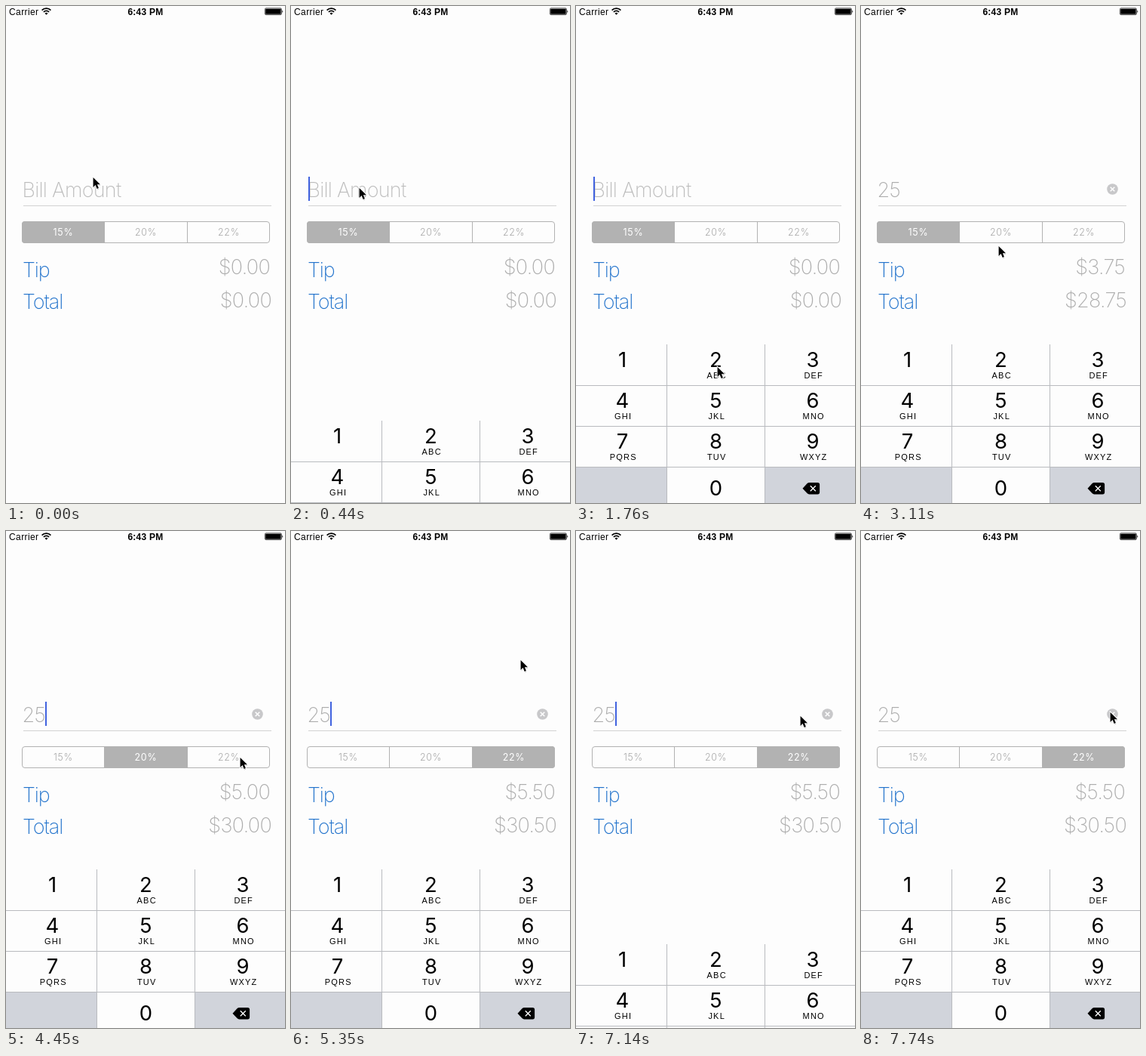
An HTML page for the animation above (8 s loop, 370 by 658 pixels).

```html
<!DOCTYPE html>
<html lang="en">
<head>
<meta charset="utf-8">
<title>Tip calculator</title>
<style>
  html, body { margin: 0; width: 100%; height: 100%; overflow: hidden; background: #fdfdfd; }
  svg { display: block; width: 100%; height: 100%; }
  text { white-space: pre; }
  .status { font: 12px "Liberation Sans", sans-serif; letter-spacing: .4px; }
  .clock { font-weight: 700; letter-spacing: .25px; text-anchor: middle; }
  .big { font: 200 27px Inter, sans-serif; fill: #adadad; letter-spacing: -.7px; }
  .label { fill: #2273cc; letter-spacing: -1.1px; }
  .amount { text-anchor: end; }
  .hint { fill: #bcbcbc; letter-spacing: -.75px; }
  .seg text { font: 300 12.5px Inter, sans-serif; letter-spacing: .7px; text-anchor: middle; fill: #a8a8a8; }
  .seg rect { fill: none; }
  .seg .on rect { fill: #b2b2b2; }
  .seg .on text { fill: #fff; font-weight: 400; }
  .digit { font: 27.5px Inter, sans-serif; text-anchor: middle; }
  .letters { font: 11px "Liberation Sans", sans-serif; letter-spacing: 1.2px; text-anchor: middle; }
</style>
</head>
<body>
<svg viewBox="0 0 370 658">
  <defs>
    <clipPath id="pill"><rect x="21" y="285" width="329" height="29" rx="4"/></clipPath>
  </defs>

  <text class="status" x="4" y="11.5">Carrier</text>
  <g fill="none" stroke="#000" stroke-width="1.7">
    <path d="M47.6 5.6a8.2 8.2 0 0 1 11.8 0M49.9 8a5 5 0 0 1 7.2 0"/>
    <path d="M53.5 11.8l-2-2.1a2.8 2.8 0 0 1 4 0z" fill="#000" stroke="none"/>
  </g>
  <text class="status clock" x="185" y="11.5">6:43 PM</text>
  <rect x="343.4" y="2.9" width="22" height="8.7" rx="1.5" fill="none" stroke="#000" stroke-width=".7"/>
  <rect x="344.2" y="3.7" width="20.4" height="7.1" rx=".6"/>
  <path d="M366.4 5.5q1.8 1.8 0 3.6z"/>

  <text class="big" id="bill" x="21.5" y="252.5"></text>
  <path d="M23 264.5H352" stroke="#d2d2d2"/>
  <rect id="caret" y="226" width="2" height="32" fill="#4062df"/>
  <g id="clear">
    <circle cx="333.5" cy="242.5" r="7.3" fill="#c8c8ca"/>
    <path d="M330.7 239.7l5.6 5.6m0-5.6l-5.6 5.6" stroke="#fff" stroke-width="1.5"/>
  </g>

  <g class="seg" id="seg"></g>
  <path d="M130.5 286v27M240.5 286v27" stroke="#b2b2b2"/>
  <rect x="21.5" y="285.5" width="328" height="28" rx="3.5" fill="none" stroke="#b2b2b2"/>

  <text class="big label" x="22" y="359">Tip</text>
  <text class="big label" x="22" y="400.5">Total</text>
  <text class="big amount" id="tip" x="350" y="355"></text>
  <text class="big amount" id="total" x="352" y="399"></text>

  <g id="keys">
    <rect y="448" width="370" height="216" fill="#fdfdfd"/>
    <path d="M0 610H120V664H0zM251 610H370V664H251z" fill="#d1d4db"/>
    <path d="M120.5 448V664M250.5 448V664M0 502.5H370M0 556.5H370M0 610.5H370" stroke="#b9bbbf"/>
    <path d="M300.5 638.7l6.2-6.6q1.1-1.1 2.6-1.1h11.2q2.6 0 2.6 2.6v10.2q0 2.6-2.6 2.6h-11.2q-1.5 0-2.6-1.1z"/>
    <path d="M310.8 635.2l7 7m0-7l-7 7" stroke="#fff" stroke-width="1.3"/>
  </g>

  <g id="pointer">
    <path d="M1 2.5V15.5l3-2.8 2.2 4.8 2.2-1-2-4.7h4z" fill="#000" opacity=".2"/>
    <path d="M.6 1V14L3.6 11.1 5.7 15.9 7.9 14.9 5.9 10.2H10z" stroke="#fff" stroke-width="1.8" paint-order="stroke"/>
  </g>
</svg>

<script>
const LOOP = 8000, START = 278, STEP = 149;
const $ = id => document.getElementById(id);
const RATES = [15, 20, 22];

function add(parent, tag, attrs, text) {
  const el = document.createElementNS("http://www.w3.org/2000/svg", tag);
  for (const name in attrs) el.setAttribute(name, attrs[name]);
  if (text) el.textContent = text;
  return parent.appendChild(el);
}

const segments = RATES.map((rate, i) => {
  const g = add($("seg"), "g", {});
  const x = [21, 130, 240][i];
  add(g, "rect", { x, y: 285, width: i ? 111 : 110, height: 29, "clip-path": "url(#pill)" });
  add(g, "text", { x: [76, 185.5, 295.5][i], y: 304 }, rate + "%");
  return g;
});

const LETTERS = ["", "ABC", "DEF", "GHI", "JKL", "MNO", "PQRS", "TUV", "WXYZ"];
LETTERS.forEach((letters, i) => {
  const x = [61.5, 185.5, 314][i % 3];
  const y = 448 + 54 * Math.floor(i / 3);
  add($("keys"), "text", { class: "digit", x, y: y + 30 }, String(i + 1));
  if (letters) add($("keys"), "text", { class: "letters", x: x + 1.2, y: y + 45 }, letters);
});
add($("keys"), "text", { class: "digit", x: 185.5, y: 648 }, "0");

// Pointer stops: time, x, y
const PATH = [
  [131, 115, 226], [420, 90, 240], [880, 90, 240], [1330, 198, 462],
  [1470, 187, 476], [1770, 187, 478], [2060, 187, 528], [2664, 187, 528],
  [3110, 182, 317], [3555, 190, 297], [3860, 190, 297], [4450, 310, 299],
  [4748, 310, 299], [5340, 304, 170], [6240, 304, 170], [6830, 297, 244],
  [7130, 297, 244], [7720, 330, 239]
];

function pointerAt(t) {
  const next = PATH.findIndex(p => p[0] > t);
  if (next === 0) return PATH[0].slice(1);
  if (next < 0) return PATH[PATH.length - 1].slice(1);
  const [t0, x0, y0] = PATH[next - 1], [t1, x1, y1] = PATH[next];
  const u = (t - t0) / (t1 - t0), e = u * u * (3 - 2 * u);
  return [x0 + (x1 - x0) * e, y0 + (y1 - y0) * e];
}

// Eased progress of a keyboard slide
function slide(t, from) {
  const u = Math.min(1, Math.max(0, (t - from) / 400));
  return 1 - (1 - u) ** 3;
}

function caretOn(t) {
  if (t < 340 || (t >= 5780 && t < 6980)) return false;
  const since = [6980, 2330, 1750, 340].find(s => t >= s);
  return Math.floor((t - since) / 500) % 2 === 0;
}

const show = (el, on) => el.setAttribute("visibility", on ? "visible" : "hidden");
const money = n => "$" + n.toFixed(2);

function draw(t) {
  const typed = t < 1750 ? "" : t < 2330 ? "2" : "25";
  const choice = t < 3840 ? 0 : t < 4740 ? 1 : 2;
  const bill = t < 2330 ? 0 : 25;
  const tip = bill * RATES[choice] / 100;
  const focused = t >= 340 && (t < 5780 || t >= 6980);

  $("bill").textContent = typed || "Bill Amount";
  $("bill").classList.toggle("hint", !typed);
  $("caret").setAttribute("x", [23, 37, 52][typed.length]);
  show($("caret"), caretOn(t));
  show($("clear"), focused && typed);
  segments.forEach((g, i) => g.classList.toggle("on", i === choice));
  $("tip").textContent = money(tip);
  $("total").textContent = money(bill + tip);

  const shown = slide(t, 340) - slide(t, 5952) + slide(t, 7043);
  $("keys").setAttribute("transform", `translate(0 ${Math.round(211 * (1 - shown))})`);
  const [x, y] = pointerAt(t).map(Math.round);
  $("pointer").setAttribute("transform", `translate(${x} ${y})`);
}

// The screen refreshes in steps, so the clock is sampled
function tick() {
  const t = performance.now() % LOOP;
  draw(START + STEP * Math.floor((t - START) / STEP));
  requestAnimationFrame(tick);
}
tick();
</script>
</body>
</html>
```
